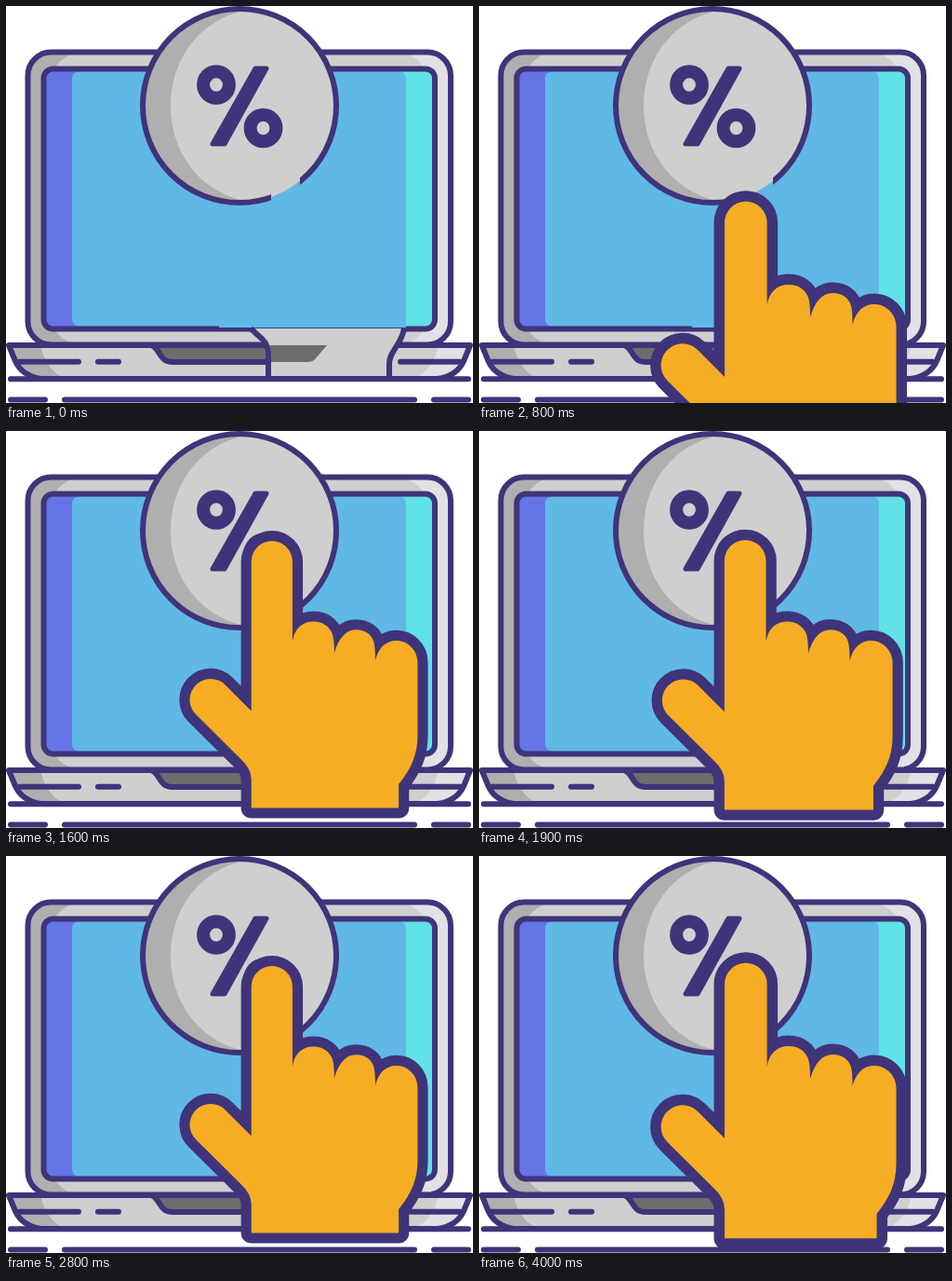
Write an HTML page that moves like this. It is 502 by 426 pixels and loops after 5000 ms.

```html
<!DOCTYPE html>
<html lang="en">
<head>
<meta charset="utf-8">
<title>Tapping a discount on a laptop</title>
<style>
  html, body { margin: 0; width: 100%; height: 100%; overflow: hidden; background: #fff; }
  svg { display: block; width: 100%; height: 100%; }
  .line { fill: none; stroke: #3f3479; stroke-width: 6; stroke-linecap: round; stroke-linejoin: round; }
  .cut { stroke-linecap: butt; }
  .ink { fill: #3f3479; stroke: #3f3479; stroke-width: 5; stroke-linejoin: round; }
  .ring { fill: none; stroke: #3f3479; stroke-width: 14; }
  .grey { fill: #cfcfd0; }
  .shade { fill: #afafb0; }
  .light { fill: #e1e1e6; }
  .blue { fill: #60b8e7; }
  #hand { fill: #f7ad23; stroke: #3f3479; stroke-width: 23; stroke-linejoin: round; paint-order: stroke; }
</style>
</head>
<body>
<svg viewBox="0 0 502 426">
  <defs>
    <rect id="lid" x="23.500" y="49.500" width="454.500" height="314" rx="25"/>
    <rect id="screen" x="40.500" y="67.500" width="420.500" height="279" rx="10"/>
    <path id="base" d="M3 364H499L492 381C487 392 478 398 464 400H38C24 398 15 392 10 381Z"/>
    <clipPath id="inLid"><use href="#lid"/></clipPath>
    <clipPath id="inScreen"><use href="#screen"/></clipPath>
    <clipPath id="inBase"><use href="#base"/></clipPath>
    <clipPath id="gap"><path d="M0 0H502V426H316V150H285V426H0Z"/></clipPath>
  </defs>

  <!-- lid and screen -->
  <use href="#lid" class="grey"/>
  <g clip-path="url(#inLid)">
    <path class="shade" d="M23 49H80Q54 54 46 80V334Q54 360 80 364H23Z"/>
    <path class="light" d="M479 49H422Q448 54 456 80V334Q448 360 422 364H479Z"/>
  </g>
  <use href="#lid" class="line"/>
  <g clip-path="url(#inScreen)">
    <path fill="#6575e6" d="M40 67H251V347H40Z"/>
    <path fill="#60e2e6" d="M251 67H462V347H251Z"/>
    <rect class="blue" x="71" y="70" width="359" height="274" rx="8"/>
  </g>
  <use href="#screen" class="line"/>
  <path class="blue" d="M229 330H430V345H229Z"/>

  <!-- base -->
  <use href="#base" class="grey"/>
  <g clip-path="url(#inBase)">
    <path class="shade" d="M0 364H37C41 381 49 394 64 400H0Z"/>
    <path class="light" d="M502 364H465C461 381 453 394 438 400H502Z"/>
  </g>
  <path fill="#6d6d6d" d="M158 364H345L333 378Q330 382 324 382H178Q170 382 166 376Z"/>
  <use href="#base" class="line"/>
  <path class="line" d="M158 365C166 369 165 382 179 382H280"/>
  <path class="line" d="M14 381.700H78M99 381.700H121M424 381.700H488"/>

  <!-- cleared area below the screen -->
  <path class="grey" d="M264 346H428C425 362 412 372 412 382V397H282V366Z"/>
  <path fill="#6d6d6d" d="M284 364H345L333 378Q330 382 324 382H284Z"/>
  <path class="line cut" d="M263 346L276 358Q282 364 282 374V398M428 346C425 364 412 370 412 384V398"/>
  <path class="line" d="M5 400.300H497M5 422.600H42M63 422.600H439M460 422.600H497"/>

  <!-- percent coin -->
  <circle class="shade" cx="251" cy="107" r="104"/>
  <path class="grey" d="M264 4C214 10 177 52 177 107S214 204 264 210A104 104 0 0 0 264 4Z"/>
  <circle class="line" cx="251" cy="107" r="104" clip-path="url(#gap)"/>
  <ellipse class="ring" cx="226" cy="84.500" rx="13.900" ry="14.300"/>
  <ellipse class="ring" cx="276.500" cy="131" rx="13.900" ry="14.300"/>
  <path class="ink" d="M268 67H280L235 148H222Z"/>

  <path id="hand" d="M264 303V137.500A22.800 22.800 0 0 1 309.600 137.500V226
    C312 211 321 204 333 204C344 204 351 210 354 218Q356 224 356 239
    C361 222 369 213 380 213C391 213 398 219 400 227Q401.500 233 401.500 247
    C405 233 413 225 425 225C438 225 448.500 236 448.500 249
    V330C448.500 352 441 367 427.500 384V410.300H264V379Q264 367 252 356
    L202.500 307A22.500 22.500 0 0 1 235 274Z"/>
</svg>
<script>
const hand = document.getElementById("hand");
const LOOP = 5000, STEP = 100;
const rise = { start: 400, end: 1000, speed: 0.475 };
const pulse = { peak: 830, period: 600, count: 5, depth: 0.052, x: 256, y: 223 };

function scaleAt(t) {
  if (t < pulse.peak || t > pulse.peak + pulse.count * pulse.period) return 1;
  const angle = 2 * Math.PI * (t - pulse.peak) / pulse.period;
  return 1 - pulse.depth * (1 - Math.cos(angle)) / 2;
}

function draw(now) {
  const t = Math.floor(now % LOOP / STEP) * STEP;
  const drop = Math.max(0, rise.end - t) * rise.speed;
  hand.style.visibility = t < rise.start ? "hidden" : "visible";
  hand.setAttribute("transform",
    `translate(${pulse.x} ${pulse.y + drop}) scale(${scaleAt(t)}) translate(${-pulse.x} ${-pulse.y})`);
}

let begin;
function tick(now) {
  begin ??= now;
  draw(now - begin);
  requestAnimationFrame(tick);
}
draw(0);
requestAnimationFrame(tick);
</script>
</body>
</html>
```
